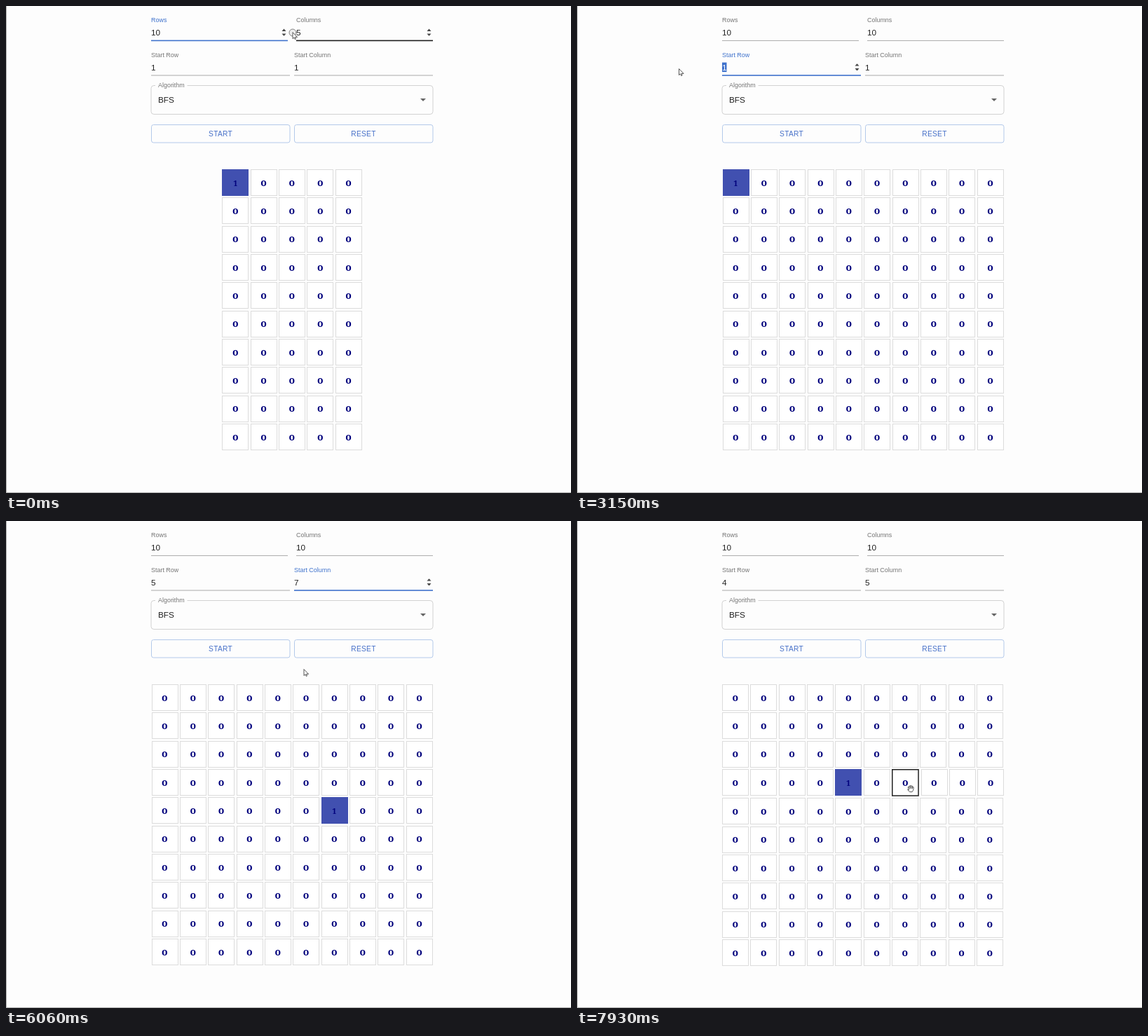
Recreate the animation shown at these times as an HTML page. Size 806 px wide and 695 px high, loop 8000 ms.

```html
<!DOCTYPE html>
<html lang="en">
<head>
<meta charset="utf-8">
<title>Grid search form</title>
<style>
  html, body { margin: 0; width: 100%; height: 100%; overflow: hidden; background: #fdfdfd; }
  svg { display: block; width: 806px; height: 695px; font-family: "Liberation Sans", Arial, sans-serif; }
  .label { font-size: 8.95px; fill: #757575; }
  .value { font-size: 11.8px; fill: #222; }
  .button { font-size: 10.2px; letter-spacing: .29px; fill: #4670c8; text-anchor: middle; }
  .cell { font: bold 14px "Noto Serif", serif; fill: #00007c; text-anchor: middle; }
  .one { font-size: 11px; }
  .cursor { fill: #fff; stroke: #444; stroke-width: .9; stroke-linejoin: round; stroke-linecap: round; }
</style>
</head>
<body>
<svg id="stage" viewBox="0 0 806 695"></svg>
<script>
const LOOP = 8000, BLUE = '#3f72cc';
const stage = document.getElementById('stage');

const fields = {
  rows: { x: 207, y: 20, w: 195, label: 'Rows' },
  cols: { x: 414, y: 20, w: 195, label: 'Columns' },
  srow: { x: 207, y: 69.6, w: 198, label: 'Start Row' },
  scol: { x: 411, y: 69.6, w: 198, label: 'Start Column' }
};

// Each step: time, cursor [kind, x, y], and whatever else changes.
const steps = [
  [0, ['ring', 409, 38], { rows: 10, cols: 5, srow: 1, scol: 1, focus: 'rows', hover: 'cols', caret: 0, sel: 0 }],
  [120, ['ibeam', 398, 38], { focus: 'cols', hover: 'rows', sel: 1 }],
  [240, ['ibeam', 378, 37]],
  [490, ['ibeam', 378, 37], { cols: 10, sel: 0, caret: 1 }],
  [1140, ['ibeam', 384, 38], { caret: 0 }],
  [1290, ['arrow', 300, 70], { hover: '' }],
  [1440, ['arrow', 241.5, 100], { hover: 'srow' }],
  [1590, ['ibeam', 228, 93], { caret: 1 }],
  [1710, ['ibeam', 222, 88]],
  [1860, ['ibeam', 218, 88], { focus: 'srow', caret: 0 }],
  [1980, ['arrow', 185, 90], { sel: 1 }],
  [2100, ['arrow', 145, 89], { hover: '' }],
  [3150, ['arrow', 145.5, 90]],
  [3270, ['ibeam', 230, 91], { srow: 5, sel: 0, caret: 1, hover: 'srow' }],
  [3390, ['ibeam', 357, 89]],
  [3540, ['arrow', 430, 92], { hover: 'scol' }],
  [3690, ['hand', 450, 148], { hover: 'alg' }],
  [3840, ['arrow', 447.5, 347], { hover: '', caret: 0 }],
  [3990, ['arrow', 452, 218]],
  [4110, ['hand', 456, 125], { hover: 'alg' }],
  [4230, ['ibeam', 440, 90], { hover: 'scol' }],
  [4380, ['ibeam', 425, 88], { focus: 'scol' }],
  [4500, ['ibeam', 398, 88], { hover: 'srow', sel: 1 }],
  [4620, ['ibeam', 371, 88]],
  [5420, ['ibeam', 371, 88], { scol: 7, sel: 0, caret: 1 }],
  [5540, ['ibeam', 377, 88]],
  [5690, ['ibeam', 391, 94]],
  [5940, ['hand', 408, 130], { hover: 'alg', caret: 0 }],
  [6060, ['arrow', 425, 212], { hover: '' }],
  [6180, ['grab', 436, 262], { hover: [0, 5] }],
  [6330, ['grab', 436.5, 365.5], { hover: [3, 5] }],
  [6480, ['grab', 432, 373], { caret: 1 }],
  [6610, ['grab', 424, 377]],
  [6760, ['grab', 413, 377.5]],
  [6910, ['grab', 400, 378], { hover: [3, 4], caret: 0 }],
  [7030, ['grab', 394, 378]],
  [7150, ['grab', 393, 378], { srow: 4, scol: 5, focus: '' }],
  [7270, ['grab', 396, 378]],
  [7390, ['grab', 404, 379]],
  [7510, ['grab', 418, 380], { hover: [3, 5] }],
  [7660, ['grab', 462, 383], { hover: [3, 6] }],
  [7810, ['grab', 470, 384]],
  [7930, ['grab', 476, 382]]
];

const text = (cls, x, y, s, extra = '') => `<text class="${cls}" x="${x}" y="${y}" ${extra}>${s}</text>`;
const rect = (x, y, w, h, extra) => `<rect x="${x}" y="${y}" width="${w}" height="${h}" ${extra}/>`;
const path = (d, extra = '') => `<path d="${d}" ${extra}/>`;

function field(name, s) {
  const { x, y, w, label } = fields[name];
  const focused = s.focus === name, hovered = s.hover === name;
  const soft = hovered && s.cursor[0] === 'arrow';
  const selected = focused && s.sel;
  const value = String(s[name]), wide = value.length * 6.5;
  let out = text('label', x, y + 3.2, label, focused ? `style="fill:${BLUE}"` : '');
  if (selected) out += rect(x, y + 11, wide, 13.5, `fill="${BLUE}"`);
  out += text('value', x, y + 22, value, selected ? 'style="fill:#fff"' : '');
  if (focused && s.caret) out += rect(x + wide, y + 11, .8, 13, 'fill="#222"');
  if (focused || hovered && !soft) {
    const a = x + w - 5.5, b = y + 17.7;
    out += path(`M${a - 3} ${b - 1.7}h6l-3 -3.4zM${a - 3} ${b + 1.7}h6l-3 3.4z`, 'fill="#444"');
  }
  const line = focused ? BLUE : soft ? '#777' : hovered ? '#1c1c1c' : '#aaa';
  const thick = focused || hovered && !soft ? 1.6 : 1;
  return out + rect(x, y + 28.9 - (thick - 1) / 2, w, thick, `fill="${line}"`);
}

function algorithm(s) {
  const line = s.hover === 'alg' ? '#333' : '#d2d2d2';
  return path('M213 113.5H211a4 4 0 0 0 -4 4v33a4 4 0 0 0 4 4H605a4 4 0 0 0 4 -4v-33a4 4 0 0 0 -4 -4H258.5',
      `fill="none" stroke="${line}"`) +
    text('label', 217, 116.4, 'Algorithm') + text('value', 217, 138.2, 'BFS') +
    path('M591 132h8l-4 4z', 'fill="#666"');
}

function button(x, label) {
  return rect(x + .5, 169.5, 197.5, 25.5, 'rx="3" fill="none" stroke="#b3c9ea"') +
    text('button', x + 99, 185.7, label);
}

// The hovered cell's thicker border widens the grid and pushes its neighbours.
function grid(s) {
  const pitch = 40.34, hot = Array.isArray(s.hover) ? s.hover : null;
  const left = 409.3 - s.cols * pitch / 2 - (hot ? .55 : 0);
  let out = '', top = '';
  for (let r = 0; r < s.rows; r++) for (let c = 0; c < s.cols; c++) {
    const lit = hot && r === hot[0] && c === hot[1];
    const fx = left + c * pitch + (hot && r === hot[0] && c > hot[1] ? 1.1 : 0);
    const fy = 233 + r * 40.33 + (hot && r > hot[0] ? 1 : 0);
    const x = Math.round(fx), y = Math.round(fy);
    const on = r === s.srow - 1 && c === s.scol - 1;
    const fill = on ? '#4150b0' : '#fff';
    if (lit) top += rect(x + .75, y + .75, 37.3, 37.3, `fill="${fill}" stroke="#222" stroke-width="1.5"`);
    else out += rect(x + .5, y + .5, 37, 37, `fill="${fill}" stroke="${on ? fill : '#dcdcdc'}"`);
    const shift = lit ? .5 : 0;
    const glyph = text(on ? 'cell one' : 'cell', (fx + 18.8 + shift).toFixed(1),
      (fy + 23.7 + shift).toFixed(1), on ? '1' : 'o');
    if (lit) top += glyph; else out += glyph;
  }
  return out + top;
}

const arrow = path('M0 0V8.6L2 6.9L3.3 9.6L4.6 9L3.4 6.4H6.2Z');
const cursors = {
  arrow,
  ring: '<circle r="5" fill="#eee" stroke="#777"/>' + arrow,
  ibeam: path('M-2.3 -4H-.6L0 -3.5L.6 -4H2.3M0 -3.5V3.5M-2.3 4H-.6L0 3.5L.6 4H2.3', 'fill="none"'),
  hand: path('M-2 1V-4Q-1.2 -5.2 -.4 -4V-1L2.6 -.5Q3.8 0 3.6 1.4L2.8 4.5H-1.4L-4 1.4Q-3.6 .2 -2 1Z'),
  grab: path('M-2.7 1.5L-3.8 -2.2Q-3 -3.6 -2.2 -2.4Q-2.4 -4.4 -.8 -4Q.2 -5.2 1.2 -3.8Q2.8 -4.4 3 -2.6Q4.4 -2.4 4.2 -.8L3.6 2.2L2.2 4.6H-1.4L-4.4 1.2Q-4.2 0 -2.7 1.5Z') +
    path('M-2.2 -2.4L-1.5 -.2M-.6 -3.6L-.2 -.6M1.2 -3.6V-.6M3 -2.6L2.3 -.4', 'fill="none"')
};

function draw(s) {
  const [kind, x, y] = s.cursor;
  stage.innerHTML = Object.keys(fields).map(name => field(name, s)).join('') +
    algorithm(s) + button(207, 'START') + button(411, 'RESET') + grid(s) +
    rect(0, 0, 1, 695, 'fill="#b0b0b0"') + rect(0, 694, 806, 1, 'fill="#b0b0b0"') +
    `<g class="cursor" transform="translate(${x} ${y})">${cursors[kind]}</g>`;
}

let state = {};
const states = steps.map(([, cursor, change]) => state = { ...state, ...change, cursor });
const start = performance.now();
let shown = -1;

function tick() {
  const t = (performance.now() - start) % LOOP;
  const now = steps.filter(step => step[0] <= t).length - 1;
  if (now !== shown) draw(states[shown = now]);
  requestAnimationFrame(tick);
}
tick();
</script>
</body>
</html>
```
